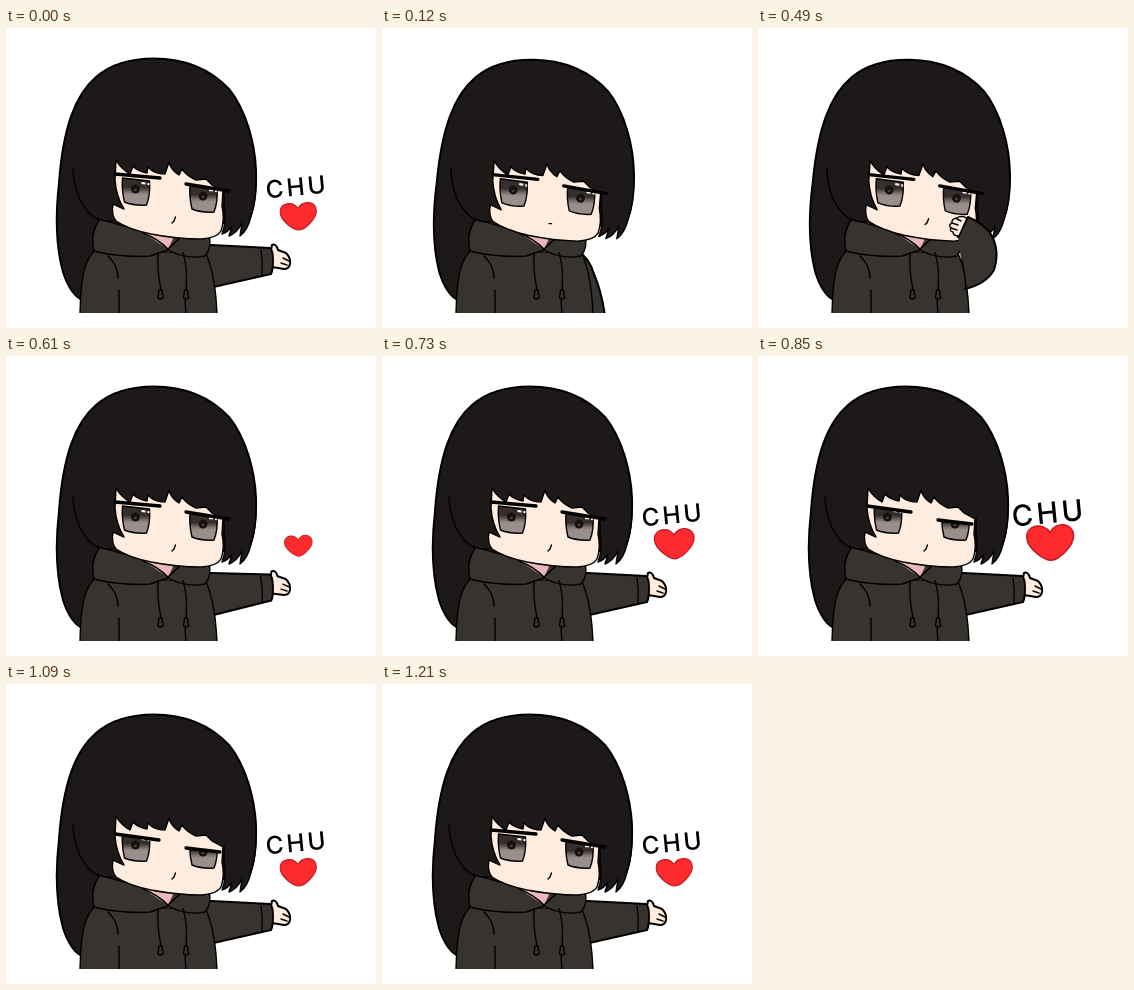
Write an HTML page that moves like this. It is 370x300 px and loops after 1960 ms.

```html
<!DOCTYPE html>
<html lang="en">
<head>
<meta charset="utf-8">
<title>Blown kiss</title>
<style>
  html, body { margin: 0; width: 100%; height: 100%; overflow: hidden; background: #fff; }
  svg { display: block; width: 100vw; height: 100vh; }
  .ink { fill: none; stroke: #000; stroke-width: 1.4; stroke-linecap: round; stroke-linejoin: round; }
  .outer { stroke-width: 2; }
  .hair { fill: #1d1918; }
  .cloth { fill: #37332f; }
  .skin { fill: #feecdf; }
  .lash { stroke-width: 3.3; }
  text { font: 500 24.5px Inter, sans-serif; letter-spacing: 2.8px; text-anchor: middle; }
</style>
</head>
<body>
<svg viewBox="0 0 370 300">
  <defs>
    <linearGradient id="iris" x1="0" y1="0" x2="0" y2="1">
      <stop offset=".35" stop-color="#362e2c"/>
      <stop offset=".52" stop-color="#7c716e"/>
      <stop offset=".62" stop-color="#998e8a"/>
    </linearGradient>
    <clipPath id="stage"><rect width="370" height="285"/></clipPath>
    <clipPath id="leftLid"><path id="leftLidShape"/></clipPath>
    <clipPath id="rightLid"><path id="rightLidShape"/></clipPath>
    <g id="eye">
      <path class="ink" style="fill:url(#iris)" d="M-13 -13 L14 -10 Q15 4 11 14 Q-1 15 -11 11 Q-14 -1 -13 -13Z"/>
      <circle r="4.5" cy="-2" fill="#171211"/>
      <circle r="1.3" cy="-1" fill="#4b4341"/>
      <path d="M6 -8 l4 .5 M12 -7 l2 .3" stroke="#fff" stroke-width="2"/>
    </g>
  </defs>

  <g clip-path="url(#stage)">
    <g class="head">
      <path class="ink outer hair" d="M76 272 Q64 266 57 244 Q47 208 53 155 C57 100 69 67 90 49 C105 36 126 30.500 148 30.500
        C180 30.500 205 42 223 61 C240 82 249 115 250 142 Q251 172 244 190 L110 215Z"/>
    </g>

    <g id="armOut">
      <path class="ink outer skin" d="M265 222 L266 217 Q270 215 272 222 L280 225 Q285 230 284 236 Q283 241 278 241 L266 239Z"/>
      <path class="ink" d="M277 230 L283 233 M275 235 L281 237"/>
      <path class="ink outer cloth" d="M196 216.500 L264 220 Q267 222 267 232 Q267 243 265 246 L203 260Z"/>
      <path class="ink" d="M255 222 Q257 234 256 247"/>
    </g>
    <path id="armDown" class="ink outer cloth" d="M195 222 Q207 229 212 246 Q220 265 223 288 L195 288Z"/>

    <path class="ink cloth" d="M89 222 Q78 233 76 254 Q74 270 74 288 L211 288 Q210 250 200 225Z"/>
    <path class="ink" d="M102 228 Q112 238 112 250 M113 262 V288 M179 270 L180 288"/>
    <path class="ink cloth" d="M94 191 Q84 204 88 223 Q116 230 144 228 L162 222 Q181 232 199 228 Q206 220 203 207 L172 209 L138 204Z"/>
    <path fill="#e9b7b9" d="M130 198 L139 206 L162 221 L167 211 L160 203Z"/>
    <path class="ink" d="M137 205 Q152 211 162 221 L173 211"/>
    <path class="ink" d="M152 225 Q151 242 155 262 M177 225 Q182 240 180 262"/>
    <path class="ink cloth" d="M153 262 h3 l1 8 q-2.500 2 -5 0Z M178.500 262 h3 l1 8 q-2.500 2 -5 0Z"/>

    <g class="head">
      <path class="hair" d="M67 140 Q68 174 89 190 L107 195 L190 200 L230 150 L150 60Z"/>
      <path class="ink" d="M67 140 Q68 174 89 190 Q98 194 107 193"/>
      <path class="ink skin" d="M110 132 L109 152 Q110 168 118 181 L107 176 Q105 187 110 193
        Q122 201 145 206 Q171 211 195 211 Q211 210 215 203 Q219 192 216 178 L217 163 L206 157
        L200 151 L190 152 Q181 148 176 141 L173 147 Q165 142 163 134 L159 146 Q148 146 142 139
        L141 145 Q131 143 127 138 L124 146 Q115 141 110 132Z"/>
      <path class="ink hair" d="M218 162 Q218 170 218 180 Q221 192 216 206 Q222 204 226 198 L223 208
        Q231 205 236 195 L234 208 Q242 202 245 188 Q251 170 250 142"/>
      <g clip-path="url(#leftLid)"><use href="#eye" x="129.500" y="163"/></g>
      <g clip-path="url(#rightLid)"><use href="#eye" x="197" y="170"/></g>
      <path id="lashes" class="ink lash"/>
      <path id="mouth" class="ink"/>
    </g>

    <g id="armCheek">
      <path class="ink outer cloth" d="M200 209 L210 189 Q227 196 234 208 Q242 224 236 242 Q228 256 207 261"/>
      <path class="ink" d="M204 232 Q207 246 208 260"/>
      <path class="ink skin" d="M209 190 Q203 187 199 190 Q193 191 194 195 Q190 197 193 200 Q191 203 195 204 Q195 208 201 208Z"/>
      <path class="ink" d="M199 191 L203 193 M194 195 L200 197 M193 200 L199 202"/>
    </g>
  </g>

  <g id="heart">
    <path d="M0 13.500 C-5 13.500 -18 4 -18 -5 C-18 -14.500 -5 -16.500 0 -8 C5 -16.500 18 -14.500 18 -5 C18 4 5 13.500 0 13.500Z"
      fill="#fd2b2e" stroke="#c4191e" stroke-width="1.2" transform="translate(0 -6) rotate(-3)"/>
  </g>
  <g id="word"><text x="1" y="-1.500" transform="rotate(-5.500)">CHU</text></g>
</svg>

<script>
const LOOP = 1960;
const byId = id => document.getElementById(id);
const heads = document.querySelectorAll('.head');

// Lash end points: left eye, then right eye
const LIDS = {
  open: [[109, 146, 154, 150], [180, 156, 223, 163]],
  half: [[109, 150, 153, 156], [180, 164, 214, 168]],
  shut: [[111, 169, 149, 173], [183, 177, 210, 181]]
};
const MOUTHS = { dot: 'M166 194 h2.5', kiss: 'M169.5 189 L168 193 L166 195' };

// Each pose holds from its time until the next one begins
const POSES = [
  { at: 0, arm: 'Out', heart: 1, word: 1 },
  { at: 120, arm: 'Down', mouth: 'dot' },
  { at: 240, arm: 'Cheek', mouth: 'dot' },
  { at: 490, arm: 'Cheek' },
  { at: 610, arm: 'Out', raise: -1.5, heart: .77 },
  { at: 730, arm: 'Out', heart: 1.1, word: 1 },
  { at: 850, arm: 'Out', heart: 1.3, word: 1.19, lids: 'half' },
  { at: 970, arm: 'Out', heart: 1, word: 1, lids: 'shut' },
  { at: 1090, arm: 'Out', heart: 1, word: 1, lids: 'half' },
  { at: 1210, arm: 'Out', heart: 1, word: 1 }
];

function show({ arm, raise = 0, heart = 0, word = 0, lids = 'open', mouth = 'kiss' }) {
  for (const name of ['Out', 'Down', 'Cheek']) {
    byId('arm' + name).style.display = name === arm ? '' : 'none';
  }
  byId('armOut').setAttribute('transform', `rotate(${raise} 205 235)`);
  const tilt = arm === 'Out' ? 0 : 1;
  heads.forEach(head => head.setAttribute('transform', `rotate(${tilt} 75 255)`));

  const lines = LIDS[lids].map(([x1, y1, x2, y2]) => `M${x1} ${y1} L${x2} ${y2}`);
  byId('lashes').setAttribute('d', lines.join(' '));
  ['leftLidShape', 'rightLidShape'].forEach((id, i) => {
    byId(id).setAttribute('d', lids === 'shut' ? '' : lines[i] + ' v40 h-50Z');
  });
  byId('mouth').setAttribute('d', MOUTHS[mouth]);

  // Both grow upwards from a point below their middle
  byId('heart').setAttribute('transform', `translate(292.5 194.5) scale(${heart})`);
  byId('word').setAttribute('transform', `translate(291 169) scale(${word})`);
}

function tick() {
  const time = performance.now() % LOOP;
  show(POSES.findLast(pose => pose.at <= time));
  requestAnimationFrame(tick);
}
tick();
</script>
</body>
</html>
```
